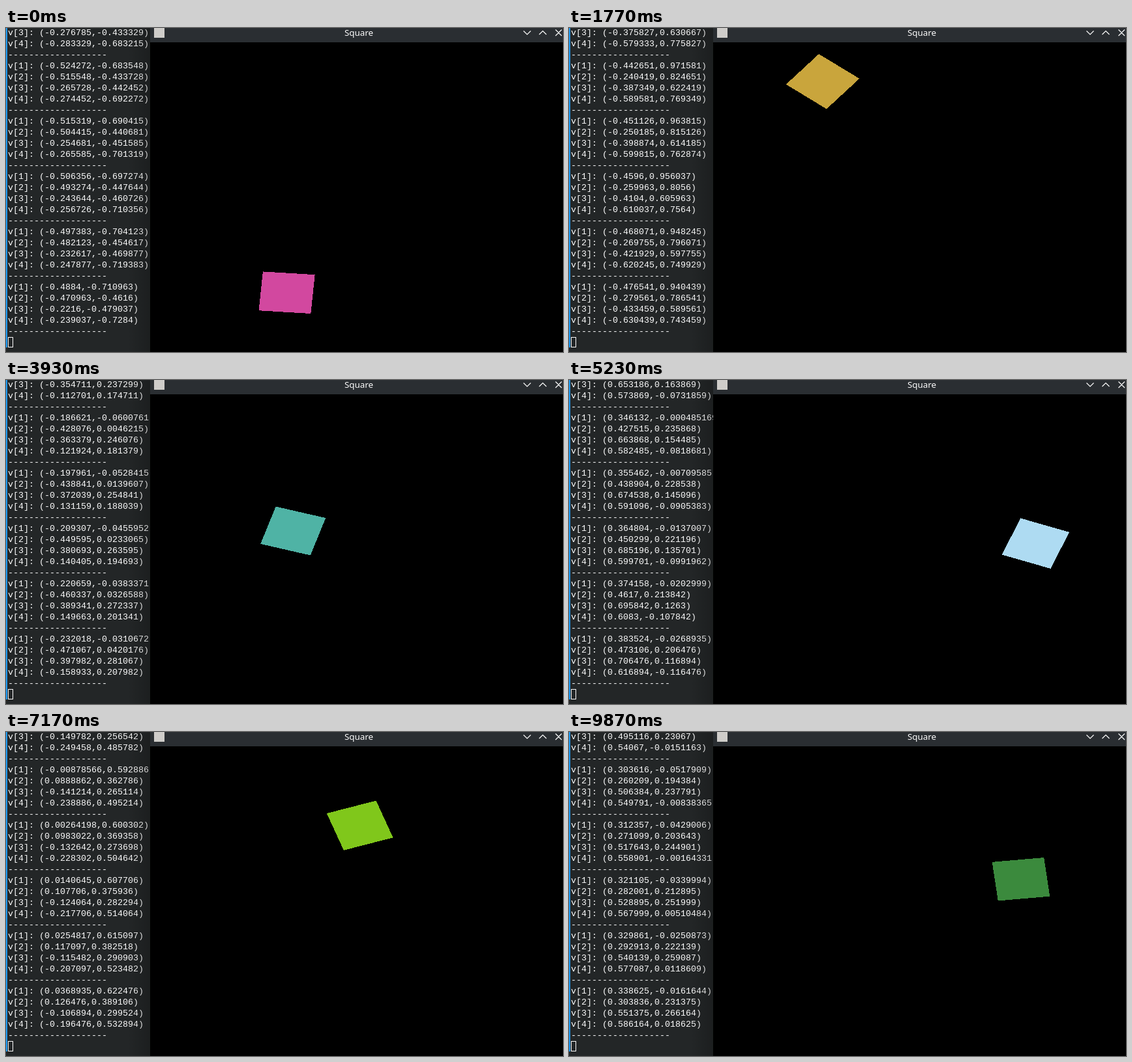
Write an HTML page that moves like this. It is 854 px wide and 498 px high and loops after 9.91 s.

```html
<!DOCTYPE html>
<html lang="en">
<head>
<meta charset="utf-8">
<title>Square</title>
<style>
  html, body { margin: 0; width: 100%; height: 100%; overflow: hidden; background: #232627; }
  #stage { position: relative; width: 854px; height: 498px; overflow: hidden; background: #232627; }
  #stage > * { position: absolute; }
  #edge { left: 0; top: 0; width: 2px; height: 491px; background: #1d99f3; }
  #log {
    left: 3px; top: -1px; margin: 0; color: #fcfcfc;
    font: 13.33px/17px "Liberation Mono", monospace;
  }
  #cursor { left: 3px; top: 475px; width: 8px; height: 16px; box-sizing: border-box; border: 1px solid #fcfcfc; }
  #shadow { left: 186px; top: 0; width: 35px; height: 498px; background: linear-gradient(90deg, #0000, #0003); }
  #bar { left: 221px; top: 0; width: 640px; height: 22px; background: #2a2e32; }
  #title {
    left: 221px; top: -2px; width: 640px; text-align: center; color: #fcfcfc;
    font: 13.33px/18px "Noto Sans", sans-serif;
  }
  #icon { left: 227px; top: 0; width: 16px; height: 15px; background: #cfcdca; }
  #buttons { left: 780px; top: 0; fill: none; stroke: #fcfcfc; stroke-width: 1.2; }
  #view { left: 221px; top: 22px; background: #000; overflow: hidden; }
</style>
</head>
<body>
<div id="stage">
  <div id="edge"></div>
  <pre id="log"></pre>
  <div id="cursor"></div>
  <div id="shadow"></div>
  <div id="bar"></div>
  <div id="title">Square</div>
  <div id="icon"></div>
  <svg id="buttons" width="74" height="22">
    <path d="M13.5 4.5l5.5 5.5 5.5-5.5M37.5 10l5.5-5.5 5.5 5.5M62.5 2.5l9.5 9.5M72 2.5l-9.5 9.5"/>
  </svg>
  <svg id="view" width="640" height="480">
    <polygon id="square" shape-rendering="crispEdges"/>
  </svg>
</div>
<script>
const LOOP = 9910;
const HISTORY = 5;
const RADIUS = 0.176757;

// One colour per wall hit.
const COLORS = [
  '#d2489f', '#de6368', '#5fc49a', '#c9a53c', '#3d21f3', '#9a5bd0', '#4fb3a5', '#d98046',
  '#aedbf2', '#7a8fd6', '#c45a8a', '#80c71b', '#58a8c8', '#ecad8a', '#a79a4e', '#3b8a3d'
];

// Time in ms, simulation step drawn, simulation step printed.
const PACE = [
  [0, 1, 0], [800, 116, 114], [2700, 389, 388], [5230, 754, 754],
  [7170, 1034, 1030], [8400, 1207, 1206], [9870, 1419, 1416]
];

// Runs of screen updates: start, end, number of intervals.
const RUNS = [
  [0, 800, 24], [1100, 2070, 21], [2100, 2700, 11], [2730, 3070, 6],
  [3100, 4030, 18], [4130, 5100, 18], [5130, 5230, 2], [5270, 6100, 13],
  [6130, 7070, 17], [7130, 7170, 1], [7230, 7830, 11],
  [8070, 8400, 7], [8430, 9030, 12], [9070, 9870, 15]
];

// Updates land on a 30 Hz grid, in whole hundredths of a second.
const snap = ms => Math.round(Math.round(ms * 0.03) / 0.3) * 10;
const updates = RUNS.flatMap(([start, end, n]) =>
  Array.from({ length: n + 1 }, (_, i) => snap(start + (end - start) * i / n)));

function simulate(count) {
  const states = [];
  let x = -0.405, y = -0.555, vx = 0.01, vy = -0.008, hits = 0;
  for (let i = 0; i < count; i++) {
    if (i) { x += vx; y += vy; }
    const points = [135, 45, -45, -135].map(corner => {
      const angle = (88.5 - i / 2 + corner) * Math.PI / 180;
      return [x + RADIUS * Math.cos(angle), y + RADIUS * Math.sin(angle)];
    });
    const outside = axis => points.some(p => Math.abs(p[axis]) > 1);
    if (outside(0) && x * vx > 0) { vx = -vx; hits++; }
    if (outside(1) && y * vy > 0) { vy = -vy; hits++; }
    states.push({ color: COLORS[hits % COLORS.length], points });
  }
  return states;
}

const states = simulate(PACE[PACE.length - 1][1] + HISTORY + 1);
const log = document.getElementById('log');
const square = document.getElementById('square');

function stepAt(time, column) {
  const i = Math.max(1, PACE.findIndex(p => p[0] >= time));
  const a = PACE[i - 1], b = PACE[i];
  return Math.round(a[column] + (b[column] - a[column]) * (time - a[0]) / (b[0] - a[0]));
}

const num = v => String(Number(v.toPrecision(6)));

function printed(state) {
  return [
    ...state.points.map(([x, y], i) => `v[${i + 1}]: (${num(x)},${num(y)})`),
    '-'.repeat(19)
  ];
}

function render(time) {
  const drawn = states[stepAt(time, 1) + HISTORY];
  square.setAttribute('fill', drawn.color);
  square.setAttribute('points', drawn.points.map(([x, y]) =>
    `${(320 + 320 * x).toFixed(2)},${(240 - 240 * y).toFixed(2)}`).join(' '));

  const last = stepAt(time, 2) + HISTORY;
  log.textContent = states.slice(last - HISTORY, last + 1).flatMap(printed).slice(-28).join('\n');
}

const begin = performance.now();
let shown = -1;

function tick() {
  const t = (performance.now() - begin) % LOOP;
  const time = updates.filter(u => u <= t).pop();
  if (time !== shown) render(shown = time);
  requestAnimationFrame(tick);
}
tick();
</script>
</body>
</html>
```
